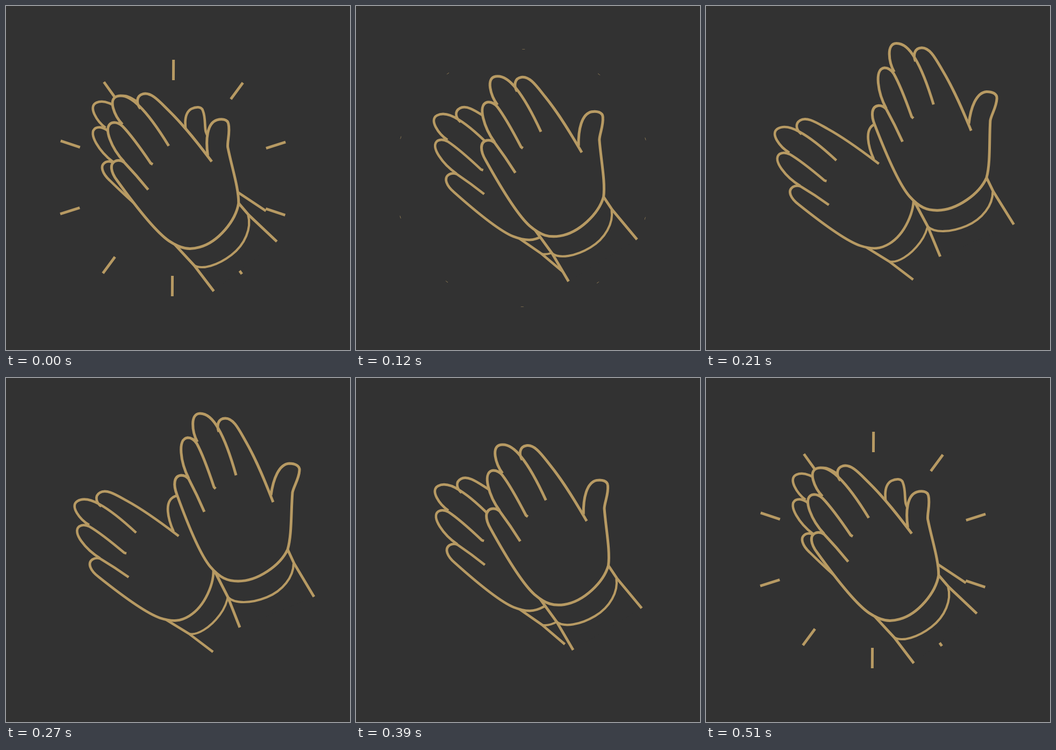
An HTML page with a canvas that plays this animation: 640 by 640 pixels, repeating every 0.54 s.

```html
<!DOCTYPE html>
<html lang="en">
<head>
<meta charset="utf-8">
<title>Clapping hands</title>
<style>
  html, body { margin: 0; width: 100%; height: 100%; overflow: hidden; background: #323232; }
  canvas { display: block; width: 100%; height: 100%; }
</style>
</head>
<body>
<canvas id="stage" width="640" height="640"></canvas>
<script>
const ctx = document.getElementById('stage').getContext('2d');
const BACKGROUND = '#323232';
const GOLD = '#b79a63';
const STEP_MS = 30;
const STEPS = 18;
const LAST = STEPS - 1;

// One hand, shared by both sides; each finger starts at its inner crease.
const FINGERS = [
  'M497 231 C486 203 469 158 446 118 C434 97 424 75 408 75 C395 75 391 88 396 100',
  'M428 181 C421 156 409 118 395 94 C386 78 374 66 361 66 C342 66 346 100 356 119',
  'M390 206 L387 203 C378 176 367 144 355 122 C349 113 343 111 338 111 C318 113 325 158 340 187',
  'M369 249 C360 228 350 207 340 188 C336 183 331 181 326 181 C312 182 311 199 318 217 ' +
    'C334 261 360 327 380 351 C398 372 412 378 432 378 C468 378 510 349 524 319 ' +
    'C532 292 530 250 533 213 C535 202 545 188 546 172 C547 163 537 159 527 159 ' +
    'C508 160 497 188 493 218'
].join(' ');
const handLines = new Path2D(FINGERS);
const handArea = new Path2D('M' + FINGERS.slice(1).replace(/M/g, 'L') + 'Z');
const armLines = new Path2D('M388 359 L413 408 L435 464 M524 319 L536 345 L573 407');
const armArea = new Path2D('M388 359 L413 408 L435 464 L573 407 L536 345 L524 319Z');
const band = new Path2D('M413 408 C425 420 455 420 485 408 C515 396 535 370 535 345');
const ANCHOR = [448.3, 289.2];

// Keys hold [step, travel along the line from -> to, rotation in degrees].
const front = {
  scale: 1, from: [351.8, 358.8], to: [448.3, 289.2],
  keys: [[0, 0, -15.8], [4, .304, -9.05], [6, .762, -3.33], [8, 1.085, .2],
         [9, 1, 0], [11, .722, -3.68], [13, .397, -8.9], [LAST, 0, -15.8]]
};
const back = {
  scale: .932, from: [331.3, 332.4], to: [310.8, 364.1],
  keys: [[0, 0, -25.6], [4, .487, -28.4], [6, .88, -30.8],
         [9, 1, -31.4], [11, .765, -30.15], [13, .425, -28.15], [LAST, 0, -25.6]]
};

const mix = (a, b, t) => a + (b - a) * t;

// Smooth curve through the keys, at rest at both ends.
function sample(keys, column, step) {
  const rate = i => (keys[i + 1][column] - keys[i][column]) / (keys[i + 1][0] - keys[i][0]);
  const slope = i => {
    if (i === 0 || i === keys.length - 1) return 0;
    const before = keys[i][0] - keys[i - 1][0];
    const after = keys[i + 1][0] - keys[i][0];
    return (rate(i - 1) * after + rate(i) * before) / (before + after);
  };
  let i = 0;
  while (i < keys.length - 2 && step >= keys[i + 1][0]) i++;
  const span = keys[i + 1][0] - keys[i][0];
  const t = (step - keys[i][0]) / span;
  const u = 1 - t;
  return mix(keys[i][column], keys[i + 1][column], t * t * (3 - 2 * t)) +
    span * t * u * (slope(i) * u - slope(i + 1) * t);
}

function drawHand(hand, step) {
  const travel = sample(hand.keys, 1, step);
  ctx.save();
  ctx.translate(mix(hand.from[0], hand.to[0], travel), mix(hand.from[1], hand.to[1], travel));
  ctx.rotate(sample(hand.keys, 2, step) * Math.PI / 180);
  ctx.scale(hand.scale, hand.scale);
  ctx.translate(-ANCHOR[0], -ANCHOR[1]);
  ctx.lineWidth = 5;
  ctx.fill(armArea);
  ctx.stroke(armLines);
  ctx.lineWidth = 4.2;
  ctx.stroke(band);
  ctx.lineWidth = 5;
  ctx.fill(handArea);
  ctx.stroke(handLines);
  ctx.restore();
}

// Inner and outer radius of the rays, or null while they are hidden.
function rayRadii(step) {
  if (step <= 4) {
    const rest = 1 - step / 4;
    return [239 - 57 * rest ** 1.6, 239.6 - 19.6 * rest ** 2];
  }
  if (step <= 13) return null;
  const t = (step - 13) / 4;
  return [120 + 62 * t * t, 120 + 100 * Math.sin(t * Math.PI / 2)];
}

function drawRays(step) {
  const radii = rayRadii(step);
  if (!radii) return;
  ctx.lineWidth = 5;
  ctx.beginPath();
  for (let i = 0; i < 10; i++) {
    const angle = (i * 36 + .3) * Math.PI / 180;
    const [x, y] = [Math.sin(angle), -Math.cos(angle)];
    ctx.moveTo(310.5 + x * radii[0], 320 + y * radii[0]);
    ctx.lineTo(310.5 + x * radii[1], 320 + y * radii[1]);
  }
  ctx.stroke();
}

function render(now) {
  const step = Math.floor(now / STEP_MS) % STEPS;
  ctx.fillStyle = BACKGROUND;
  ctx.strokeStyle = GOLD;
  ctx.lineJoin = 'round';
  ctx.fillRect(0, 0, 640, 640);
  drawRays(step);
  drawHand(back, step);
  drawHand(front, step);
}

let start;
function tick(now) {
  start ??= now;
  render(Math.max(0, now - start));
  requestAnimationFrame(tick);
}
render(0);
requestAnimationFrame(tick);
</script>
</body>
</html>
```
